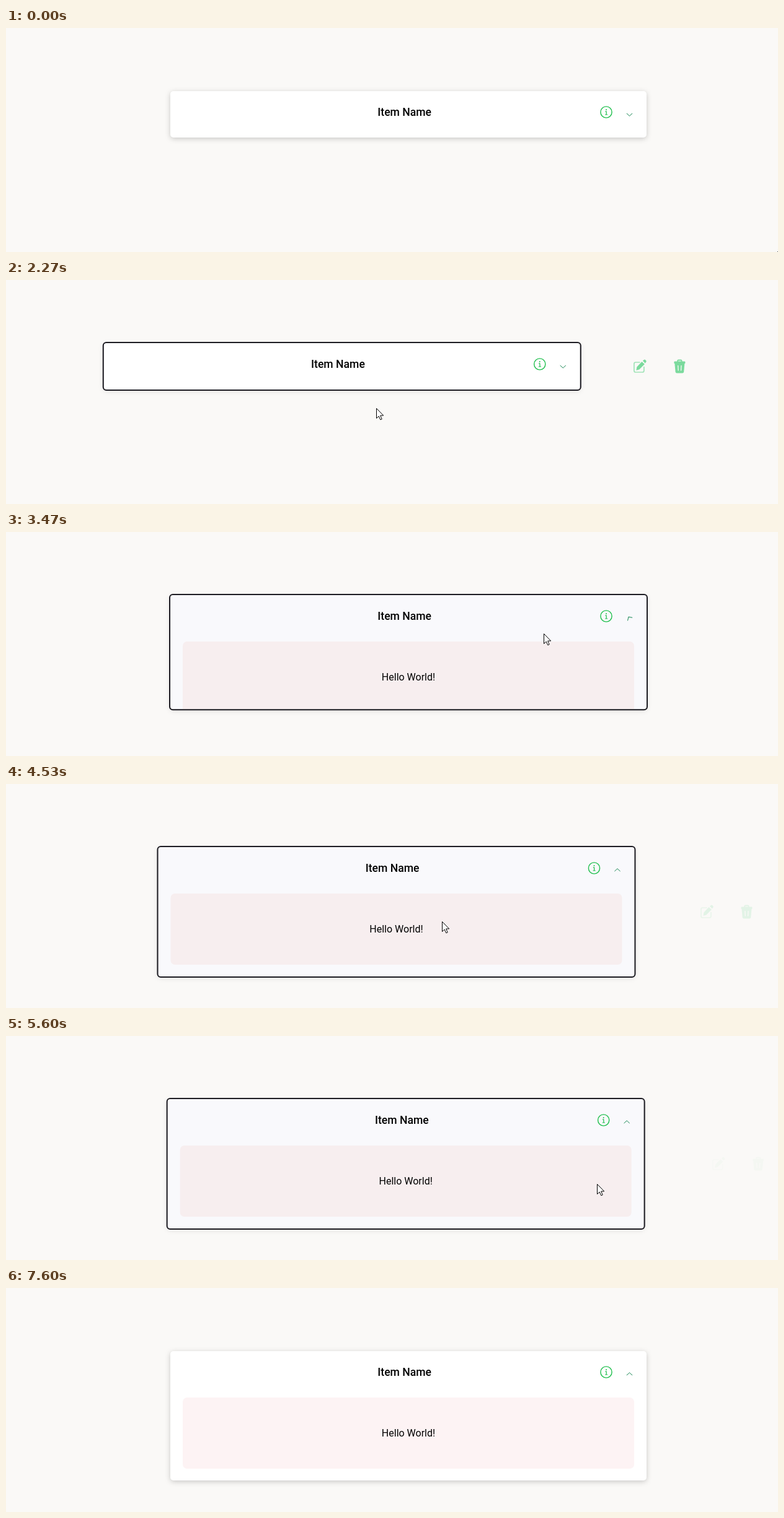
Recreate the animation shown at these times as an HTML page. Size 1245 by 362 pixels, loop 7.87 s.

```html
<!DOCTYPE html>
<html lang="en">
<head>
<meta charset="utf-8">
<title>Swipeable list item</title>
<style>
  html, body { margin: 0; width: 100%; height: 100%; overflow: hidden; background: #faf9f7; }
  svg { display: block; width: 100%; height: 100%; }
  text { font-family: Roboto, sans-serif; text-anchor: middle; }
  .line { fill: none; stroke-linecap: round; stroke-linejoin: round; }
</style>
</head>
<body>
<svg viewBox="0 0 1245 362">
  <defs>
    <clipPath id="clip"><rect id="clipBox" x="265" y="102" width="768" rx="5"/></clipPath>
  </defs>

  <g id="actions" fill="#22c55e">
    <g id="edit">
      <path class="line" stroke="#22c55e" stroke-width="1.7" opacity=".7"
        d="M0-6.5H-6.5Q-9-6.5-9-4V7Q-9 9.5-6.5 9.5H4.5Q7 9.5 7 7V1"/>
      <path d="M-5.5 6.5-4.5 1 3.5-7.5 8-3.5-.5 5ZM5-9 7-10.6Q8-11.4 9.2-10.4L10.5-9Q11.2-8 10.4-7L8.8-5Z"/>
    </g>
    <g id="trash">
      <path class="line" stroke="#22c55e" stroke-width="1.8" d="M-3.2-7.5V-9Q-3.2-10-2-10H2Q3.2-10 3.2-9V-7.5"/>
      <rect x="-9" y="-8" width="18" height="3.6" rx="1.2"/>
      <path d="M-8-4.6H8L6.8 8.8Q6.5 11 4.5 11H-4.5Q-6.5 11-6.8 8.8Z"/>
      <path class="line" stroke="#faf9f7" stroke-width="1.3" d="M-2.6-1 -2.2 6.5M2.6-1 2.2 6.5"/>
    </g>
  </g>

  <g id="item">
    <rect id="card" x="265" y="102" width="768" rx="5"/>
    <g clip-path="url(#clip)">
      <g id="content">
        <rect id="panel" x="285" y="177" width="728" height="115" rx="7"/>
        <text x="649" y="240" font-size="16">Hello World!</text>
      </g>
    </g>
    <rect id="border" x="264" y="101" width="770" rx="5" fill="none" stroke="#1c1b22" stroke-width="2"/>
    <text x="642.7" y="142" font-size="17.6" font-weight="500">Item Name</text>
    <g class="line" stroke="#1fbf4d" stroke-width="1.4" transform="translate(968 136)">
      <circle r="9.1"/>
      <path stroke-width="1.2" d="M-1.2-1.2H.2V3.8M-1.5 4H1.8"/>
      <circle cy="-4" r="1" fill="#1fbf4d" stroke="none"/>
    </g>
    <path id="chevron" class="line" stroke="#198754" d="M-4.3-1.3 0 2.7 4.3-1.3"/>
  </g>

  <path id="cursor" fill="#fff" stroke="#000"
    d="M.5.5V16.5L4.2 13.1 6.8 18.8 9.2 17.8 6.7 12H11.7Z"/>
</svg>
<script>
const LOOP = 7870, SLIDE = 183, SLIDE_TIME = 400;
const $ = id => document.getElementById(id);
const set = (id, attrs) => { for (const k in attrs) $(id).setAttribute(k, attrs[k]); };
const clamp = v => Math.min(1, Math.max(0, v));

// pointer moves: start, end, and where the pointer stops
const moves = [
  [400, 1000, 710, 150],    // enter
  [1270, 1470, 515, 200],   // swipe left
  [2130, 2800, 903, 233],   // swipe right
  [2800, 3060, 867, 164],   // back onto the card
  [4000, 4270, 879, 150],
  [4440, 4530, 704, 222],   // swipe left
  [4530, 4650, 540, 239],
  [5270, 5617, 973, 239],   // swipe right
  [6270, 6330, 965, 239],
  [6670, 6930, 60, 380]     // leave
];

// the CSS "ease" curve
function ease(x) {
  let lo = 0, hi = 1;
  for (let i = 0; i < 24; i++) {
    const s = (lo + hi) / 2;
    if (.75 * s * (1 - s) + s ** 3 < x) lo = s; else hi = s;
  }
  const s = lo, r = 1 - s;
  return .3 * s * r * r + 3 * s * s * r + s ** 3;
}

const tween = (t, start, length) => ease(clamp((t - start) / length));

// how far the card is swiped between two slide starts, 0 to 1
const swiped = (t, out, back) => tween(t, out, SLIDE_TIME) - tween(t, back, SLIDE_TIME);

function pointer(t) {
  let x = 1244, y = 361;
  for (const [start, end, toX, toY] of moves) {
    const p = clamp((t - start) / (end - start));
    x += (toX - x) * p;
    y += (toY - y) * p;
  }
  return [x, y];
}

function draw(t) {
  const swipe = swiped(t, 1302, 2170) + swiped(t, 4488, 5280);
  const open = tween(t, 3317, 300);
  const dx = -SLIDE * swipe;
  const height = 75 + 134 * open;
  const focus = t >= 1302 && t < 7600;
  const [x, y] = pointer(t);
  const hover = x >= 265 + dx && x <= 1033 + dx && y >= 102 && y <= 102 + height;

  set('item', { transform: `translate(${dx} 0)` });
  set('card', { height, fill: hover ? '#f9f9fc' : '#fff' });
  $('card').style.filter = `drop-shadow(0 2px 4px rgba(0,0,0,${focus ? .14 : .2}))`;
  set('clipBox', { height });
  set('content', { visibility: open > .001 ? 'visible' : 'hidden' });
  set('panel', { fill: hover ? '#f7eeef' : '#fdf3f4' });
  set('border', { height: height + 2, visibility: focus ? 'visible' : 'hidden' });
  set('chevron', { transform: `translate(1005.5 139.5) rotate(${180 * open})` });

  const ax = 1218.5 + 1.232 * dx, ay = 102 + height / 2;
  set('actions', { opacity: clamp(swipe) });
  set('edit', { transform: `translate(${ax - 64.5} ${ay})` });
  set('trash', { transform: `translate(${ax} ${ay})` });
  set('cursor', { transform: `translate(${Math.round(x)} ${Math.round(y)})` });
}

const begin = performance.now();
function tick() {
  draw((performance.now() - begin) % LOOP);
  requestAnimationFrame(tick);
}
tick();
</script>
</body>
</html>
```
